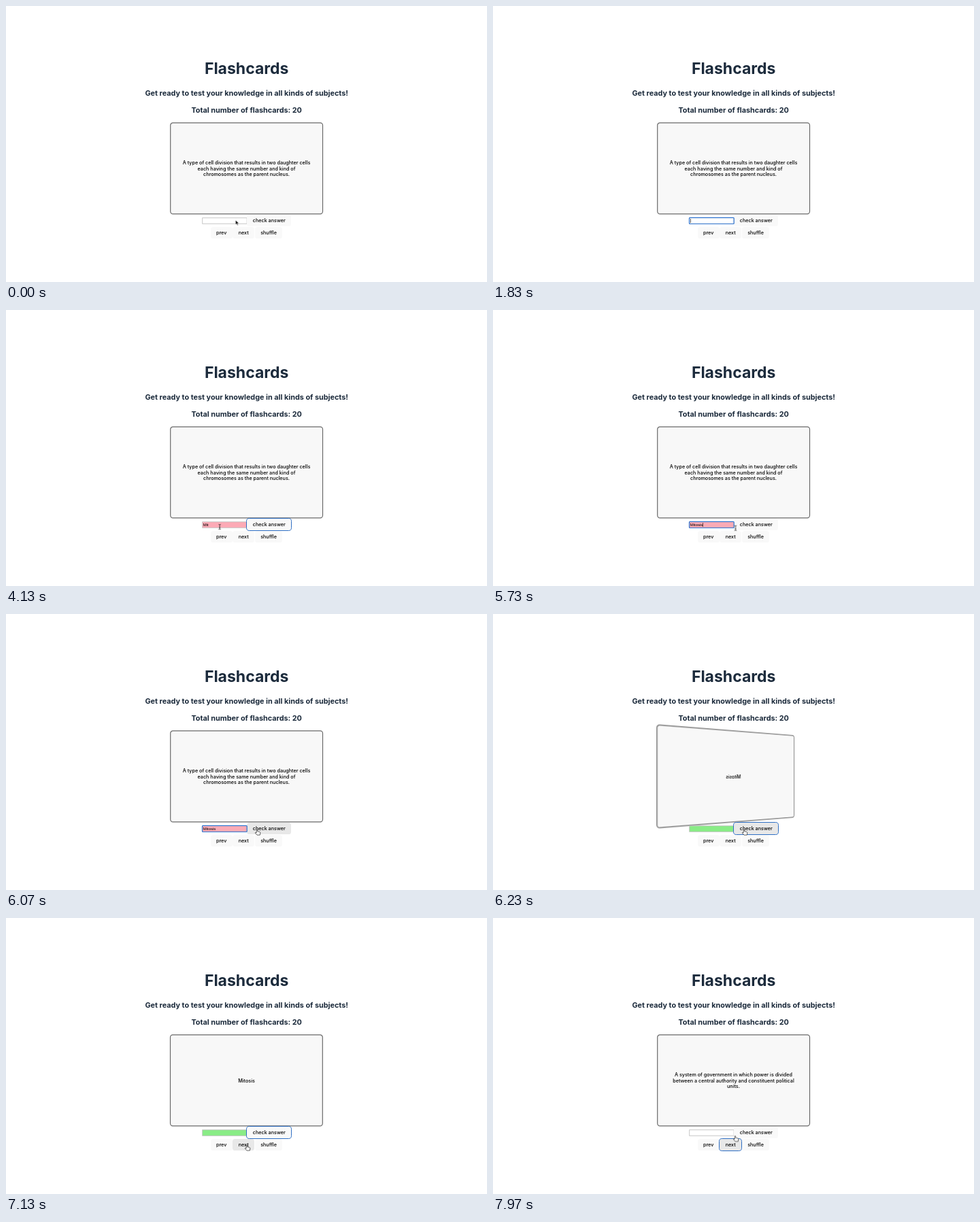
These frames come from a looping animation (707x406 px, 8000 ms). An HTML page:

```html
<!DOCTYPE html>
<html lang="en">
<head>
<meta charset="utf-8">
<title>Flashcards</title>
<style>
  html, body { margin: 0; width: 100%; height: 100%; overflow: hidden; background: #fff; }
  body { position: relative; font: 500 7.2px/8.7px Inter, sans-serif; color: #000; }
  body * { box-sizing: border-box; animation: 8s step-end infinite; }
  h1, h2, svg, .card, .button, .typed { position: absolute; margin: 0; }
  h1, h2 { left: .2px; width: 707px; text-align: center; color: #1c2b3c; font-weight: 700; white-space: nowrap; }
  h1 { top: 76.6px; font-size: 23px; line-height: 30px; }
  h2 { font-size: 10.83px; line-height: 16px; }
  .intro { top: 121.1px; }
  .total { top: 146.1px; }
  svg { left: 0; top: 0; overflow: visible; }

  .card { left: 241px; top: 171px; width: 225px; height: 136px; animation-name: flip; }
  .card rect { fill: #f8f8f8; stroke: #6a6a6a; stroke-width: 1.2px; }
  .card p {
    position: absolute; inset: 1px 0 -1px; margin: 0; display: grid; place-content: center;
    text-align: center; white-space: nowrap;
  }
  .question { animation-name: question; }
  .solution { animation-name: solution; transform: scaleX(-1); }
  .upcoming { animation-name: upcoming; }

  .button {
    height: 17px; line-height: 17px; text-align: center;
    border-radius: 3.6px; background: #f9f9f9; outline: 1.3px solid transparent;
  }
  .check { left: 354.3px; top: 307px; width: 65px; animation-name: check-hover, check-focus; }
  .prev { left: 300.7px; top: 324.6px; width: 32px; }
  .next { left: 333.2px; top: 324.6px; width: 32px; animation-name: next-hover, next-focus; }
  .shuffle { left: 366px; top: 324.6px; width: 40px; }

  .field { stroke: #c2c2c2; stroke-width: .9px; animation-name: verdict; }
  .ring { fill: none; stroke: #2f74d0; stroke-width: 1.2px; animation-name: answer-focus; }
  .typed {
    box-sizing: content-box; left: 289.7px; top: 312.6px; height: 6.7px;
    overflow: hidden; white-space: nowrap; border-right: .7px solid transparent;
    font: 400 6px/6.7px "Liberation Sans", Arial, sans-serif;
    animation-name: typing, caret;
  }

  .cursor { width: 1px; height: 1px; animation-name: travel; animation-timing-function: linear; }
  .arrow { animation-name: arrow; }
  .beam { animation-name: beam; }
  .hand { animation-name: hand; }

  @keyframes flip {
    0% { transform: perspective(440px) rotateY(0deg); }
    77.1% { transform: perspective(440px) rotateY(0deg); animation-timing-function: ease; }
    83.04% { transform: perspective(440px) rotateY(180deg); }
    91.25%, 100% { transform: perspective(440px) rotateY(0deg); }
  }
  @keyframes question { 0% { opacity: 1; } 77.1%, 100% { opacity: 0; } }
  @keyframes solution { 0% { opacity: 0; } 77.1% { opacity: 1; } 91.25%, 100% { opacity: 0; } }
  @keyframes upcoming { 0% { opacity: 0; } 91.25%, 100% { opacity: 1; } }

  @keyframes check-hover {
    0%, 49.5%, 86.25%, 100% { background-color: #f9f9f9; }
    41.875%, 73.125% { background-color: #e8e8e8; }
  }
  @keyframes check-focus {
    0%, 55%, 91.25%, 100% { outline-color: transparent; }
    44.375%, 77.1% { outline-color: #2f6fc4; }
  }
  @keyframes next-hover { 0% { background-color: #f9f9f9; } 87.25%, 100% { background-color: #e8e8e8; } }
  @keyframes next-focus { 0% { outline-color: transparent; } 91.25%, 100% { outline-color: #2f6fc4; } }

  @keyframes verdict {
    0%, 91.25%, 100% { fill: #fff; }
    44.375% { fill: #fcaab6; }
    77.1% { fill: #89ec86; }
  }
  @keyframes answer-focus {
    0%, 44.375%, 77.1%, 100% { opacity: 0; }
    3.75%, 55% { opacity: 1; }
  }
  @keyframes typing {
    0%, 22.875%, 77.1%, 100% { width: 0; }
    10% { width: .278em; }
    26.625% { width: .833em; }
    29.625% { width: 1.055em; }
    32.5% { width: 1.333em; }
    59.625% { width: 1.889em; }
    61.625% { width: 2.389em; }
    63.75% { width: 2.611em; }
    66.25% { width: 3.111em; }
  }
  @keyframes caret {
    0%, 16.625%, 38.75%, 72.5%, 100% { border-color: transparent; }
    3.75%, 22.875%, 55% { border-color: #0009; }
  }

  @keyframes travel {
    0%, 1.625% { transform: translate(337.5px, 315px); }
    4.125%, 38.75% { transform: translate(328px, 315px); }
    43%, 47.875% { transform: translate(376px, 317px); }
    51.625% { transform: translate(314px, 319px); }
    53.2% { transform: translate(325px, 323px); }
    55.375%, 68.375% { transform: translate(350px, 315px); }
    71.625% { transform: translate(356.4px, 320.8px); }
    74.5%, 84.625% { transform: translate(370px, 321px); }
    89%, 98.9% { transform: translate(355px, 338px); }
    99.125% { transform: translate(356px, 331px); }
    99.5%, 100% { transform: translate(357px, 324.5px); }
  }
  @keyframes arrow { 0% { opacity: 1; } 2.5%, 100% { opacity: 0; } }
  @keyframes beam {
    0%, 10%, 41.875%, 59.625%, 73.125%, 100% { opacity: 0; }
    2.5%, 38.75%, 49.5%, 68.375% { opacity: 1; }
  }
  @keyframes hand {
    0%, 49.5% { opacity: 0; }
    41.875%, 73.125%, 100% { opacity: 1; }
  }
</style>
</head>
<body>
  <h1>Flashcards</h1>
  <h2 class="intro">Get ready to test your knowledge in all kinds of subjects!</h2>
  <h2 class="total">Total number of flashcards: 20</h2>

  <div class="card">
    <svg width="225" height="136"><rect x=".7" y=".9" width="223.8" height="134" rx="3.6"/></svg>
    <p class="question">A type of cell division that results in two daughter cells<br>each having the same number and kind of<br>chromosomes as the parent nucleus.</p>
    <p class="solution">Mitosis</p>
    <p class="upcoming">A system of government in which power is divided<br>between a central authority and constituent political<br>units.</p>
  </div>

  <div class="button prev">prev</div>
  <div class="button shuffle">shuffle</div>
  <div class="button next">next</div>
  <svg width="707" height="406"><rect class="field" x="288.7" y="311.7" width="65.4" height="8.6"/></svg>
  <div class="button check">check answer</div>
  <svg width="707" height="406"><rect class="ring" x="288.5" y="311.4" width="65.7" height="9.1" rx=".9"/></svg>
  <span class="typed">Mitosis</span>

  <svg class="cursor">
    <path class="arrow" d="M0 0V6.6L1.5 5.2 2.6 7.7 3.7 7.2 2.6 4.8H4.7Z" fill="#000" stroke="#fff" stroke-width=".5"/>
    <path class="beam" d="M-1.6-3.7Q0-3.7 0-2.7Q0-3.7 1.6-3.7M0-2.7V2.7M-1.6 3.7Q0 3.7 0 2.7Q0 3.7 1.6 3.7M-.8 1H.8" fill="none" stroke="#222" stroke-width=".8"/>
    <path class="hand" d="M-1.8 1V-3.2a.75.75 0 0 1 1.5 0v2l3 .6q1.2.3 1.1 1.5l-.5 3.2H-1L-3.6 1.3q-.2-1.1.7-.9z" fill="#fff" stroke="#222" stroke-width=".7"/>
  </svg>
</body>
</html>
```
